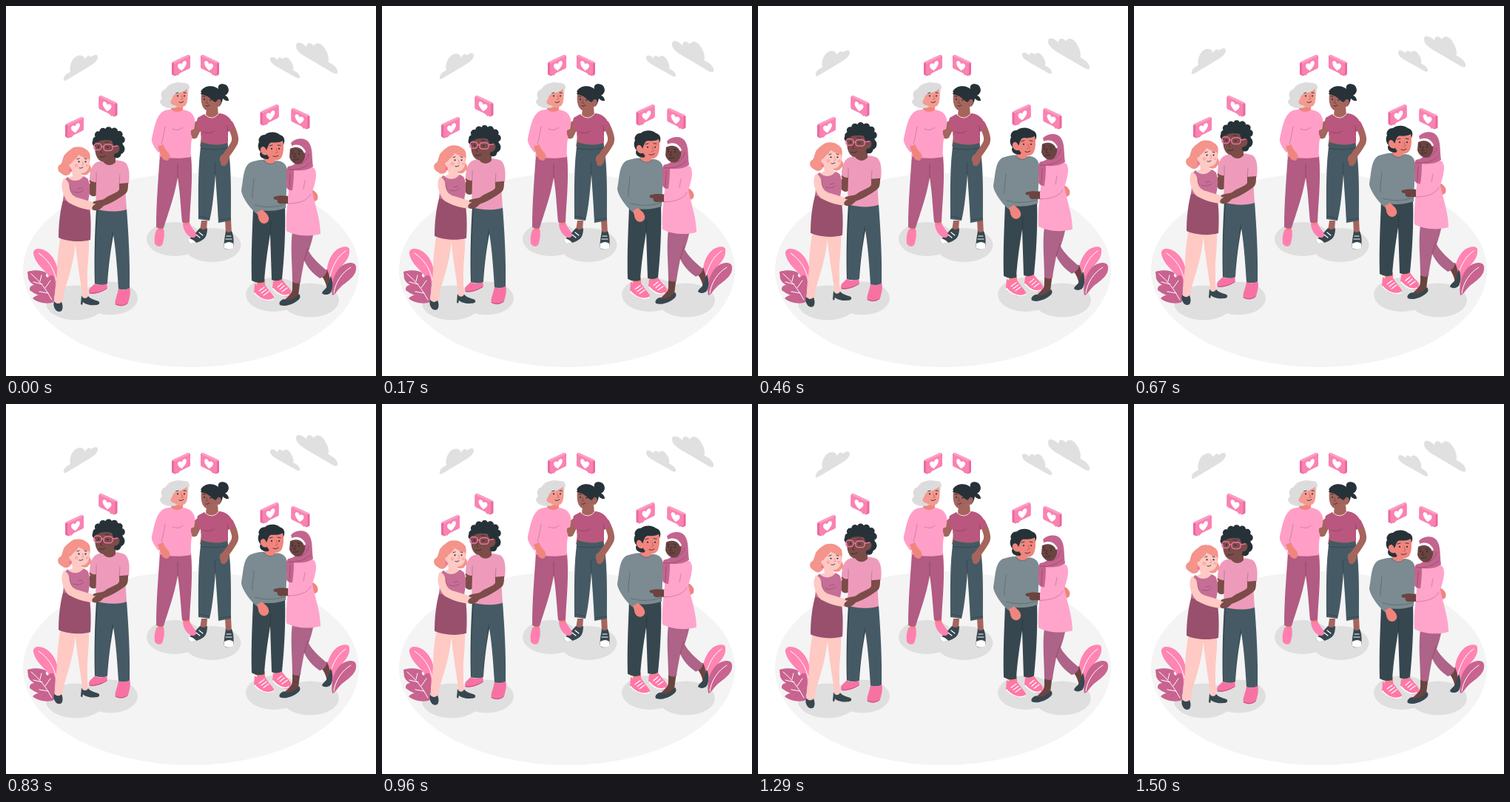
An HTML page for the animation above (1540 ms loop, 500x500 px).

```html
<!DOCTYPE html>
<html lang="en">
<head>
<meta charset="utf-8">
<title>Couples</title>
<style>
html, body { margin: 0; width: 100%; height: 100%; overflow: hidden; background: #fff; }
svg { display: block; width: 100%; height: 100%; }
.ln { fill: none; stroke-linecap: round; stroke-linejoin: round; }
.vein { stroke: #fff; stroke-width: 1; }
.brow { stroke: #263238; stroke-width: .9; }
.fold { stroke: #000; stroke-opacity: .22; stroke-width: .9; }
.lace { stroke: #fff; stroke-width: 1.2; }
.dark { fill: #263238; }
.slate { fill: #37474f; }
.denim { fill: #455a64; }
.shade { fill: #dfdfdf; }
.cloud { fill: #e0e0e0; }
.pale { fill: #ffc9c4; }
.rose { fill: #f0857d; }
.tan { fill: #a5645c; }
.umber { fill: #7b4c48; }
.deep { fill: #6b4340; }
</style>
</head>
<body>
<svg viewBox="0 0 500 500">
<defs>
  <path id="cloud" class="cloud" d="M357 72C357 67 363 69 367 73C367 69 371 68 374 72C376 68 382 69 385 75C388 79 389 84 388 87C393 89 398 93 397 97C396 99 392 97 389 95L366 82C361 79 357 76 357 72Z"/>
  <g id="like">
    <path fill="#e9699c" d="M0 12Q0 10 2 9.2L21 .6Q25-1 25 3V17L10 25L5 28.5L1.5 27.5Q0 27 0 25Z"/>
    <path fill="#ff9cc3" d="M1 10.5Q1 9.8 2 9.2L21 .6Q24-.5 24.7 2L4 12Z"/>
    <path fill="#fa82b2" d="M3 13.6Q3 12 4.7 11.2L22.3 3Q25 2 25 4.4V16.3Q25 18 23.4 18.8L11.5 24.2L8 28.2L7 26.2L5 27.2Q3 28 3 25.7Z"/>
    <path fill="#fff" d="M13.7 21.3C10 19.6 7.4 16.8 8.2 13.8C9.2 10.8 12.4 10.8 13.6 12.8C14.2 9 18.2 6.8 19.6 9.6C21 13 17 18 13.7 21.3Z"/>
  </g>
</defs>

<ellipse cx="250" cy="357" rx="227" ry="131" fill="#f4f4f4"/>
<g class="shade">
  <ellipse cx="94" cy="401" rx="40" ry="23.5"/><ellipse cx="141" cy="395" rx="37" ry="22.5"/>
  <ellipse cx="228" cy="315" rx="38" ry="23"/><ellipse cx="278.5" cy="323" rx="39" ry="23"/>
  <ellipse cx="362" cy="390" rx="38" ry="23"/><ellipse cx="411" cy="397.5" rx="39" ry="23"/>
</g>

<!-- plants -->
<g>
  <path fill="#ff85b3" d="M37 335C36 328 44 326 52 330C64 336 71 350 71 369L67 380C60 374 59 366 55 361C46 352 39 345 37 335Z"/>
  <path class="ln vein" d="M44 334C56 342 65 354 68 371"/>
  <path fill="#c96390" d="M29 359C39 356 50 357 55 361Q52 364 56 367Q62 361 65 366C68 375 67 385 65 394Q66 401 62 401C52 403 41 400 36 395Q40 391 44 391Q37 388 32 384Q31 378 38 377Q31 373 30 368Z"/>
  <path class="ln vein" d="M34 362Q51 376 62 397M46 372L48 364M53 381L60 371M49 376L37 373M57 388L45 386"/>
  <path fill="#ff85b3" d="M464 329C464 324 454 324 446 330C437 338 432 352 434 368L440 374C445 365 446 360 453 352C460 345 465 338 464 329Z"/>
  <path class="ln vein" d="M459 331C447 339 440 353 437 369"/>
  <path fill="#c96390" d="M473 353C473 346 463 345 454 351C444 359 438 375 441 391C446 389 446 386 453 379C464 370 474 364 473 353Z"/>
  <path class="ln vein" d="M466 353C453 361 445 374 443 388"/>
</g>

<!-- floating: clouds -->
<g class="float">
  <path class="cloud" d="M78 98C79 93 83 91 87 89C85 82 89 69 98 67C103 66 106 69 107 72C109 67 113 66 115 69C119 65 125 65 124 70C123 75 117 79 112 82L82 100C79 102 77 101 78 98Z"/>
  <use href="#cloud"/>
  <use href="#cloud" transform="translate(-107.8 -51.2) scale(1.4 1.46)"/>
</g>

<!-- middle couple -->
<g>
  <!-- partner on the right -->
  <path class="tan" d="M262 153C253 156 247 166 247 173C249 179 254 181 258 178L264 166Z"/>
  <path class="tan" d="M265 170H299L300 190H262ZM264 290H272L271 304H262ZM296 288H304L305 308H297Z"/>
  <path class="denim" d="M264 184C275 188 289 189 299 185C305 212 304 256 304 290L287 293C286 268 284 245 283 228C281 252 279 274 275 290L260 288C260 250 259 215 264 184Z"/>
  <path class="ln fold" d="M283 228L282 211M262 192Q280 196 300 192M289 289L304 287M261 284L275 287"/>
  <path class="slate" d="M262 300C266 303 269 302 272 300C272 306 271 312 267 315C261 320 252 322 247 319C246 316 250 312 254 309Z"/>
  <path class="slate" d="M297 304C300 307 303 306 305 304C308 311 308 319 307 326C304 330 298 330 295 327C294 319 296 311 297 304Z"/>
  <path fill="#fff" d="M247 314Q253 315 257 320Q250 322 247 319ZM295 321Q302 317 307 321L307 327Q301 331 295 327Z"/>
  <path class="ln lace" d="M257 309L262 313M261 306L266 310M298 311H304M297 315H305"/>
  <path class="ln" stroke="#a5645c" stroke-width="9" d="M303 160C308 170 311 179 309 184C306 191 300 198 296 204"/>
  <path class="tan" d="M293 200C288 203 288 208 290 211C289 215 294 218 297 215C301 211 302 205 302 200Z"/>
  <path class="tan" d="M271 138L286 136L287 148C281 153 274 152 270 148Z"/>
  <path fill="#b9577f" d="M268 146C274 153 283 152 288 145C298 146 304 151 309 164C306 168 303 169 300 170L300 184C288 189 273 187 264 182L263 170C258 165 257 158 259 151Z"/>
  <path class="ln" stroke="#ffe1d8" stroke-width="1" d="M269 147Q279 156 287 146"/>
  <path class="ln fold" d="M266 170Q274 174 281 169M300 170L299 162"/>
  <path class="dark" d="M263 116C267 107 280 106 287 112C285 105 294 103 299 108C303 114 300 119 296 121C300 122 301 126 301 128C298 129 295 127 293 125C292 130 291 133 288 136L280 125Z"/>
  <path class="tan" d="M264 119C267 114 276 114 279 120C281 124 283 127 284 128C287 123 293 127 290 133C288 136 286 137 284 136C281 141 274 143 269 140C264 136 263 127 264 119Z"/>
  <path class="dark" d="M263 119C265 112 274 110 281 113C288 117 289 123 286 127L283 130C278 128 275 121 263 119Z"/>
  <g class="dark"><circle cx="268" cy="126" r="1.1"/><circle cx="276.5" cy="127" r="1.1"/></g>
  <path class="ln brow" d="M266 122L269 122M275 123L279 124M270 135Q273 136 275 134"/>
  <path class="ln" stroke="#7b4541" stroke-width=".9" d="M272 127L270.5 131L273 131.5"/>

  <!-- partner on the left -->
  <path class="rose" d="M206 296H213L212 304H205ZM238 290H247L251 301H242Z"/>
  <path fill="#ff80b0" d="M204 301C207 305 210 304 213 301C215 309 213 318 211 323C208 326 203 325 201 321C200 314 201 307 204 301Z"/>
  <path fill="#ff80b0" d="M239 293C242 297 246 297 248 294C251 300 257 305 257 310C256 314 250 314 246 310C241 305 239 299 239 293Z"/>
  <path fill="#b25b83" d="M208 201H250C253 235 249 265 248 292Q243 294 238 292C236 270 235 250 232 232C227 260 219 280 213 300Q208 302 203 299C203 265 206 232 208 201Z"/>
  <path class="ln fold" d="M232 232L232 213"/>
  <path fill="#ff9fc7" d="M213 142C220 139 236 139 243 141C252 143 257 151 255 162C254 169 249 178 250 204C235 207 220 206 207 203L210 186C207 190 213 194 212 195L206 198C200 191 196 184 197 179C200 168 202 148 213 142Z"/>
  <path class="rose" d="M205 190L212 187C214 192 217 196 220 199C223 203 221 207 218 209C214 209 210 206 209 201Z"/>
  <path class="ln fold" stroke="#b25b83" d="M215 163Q213 176 210 187M225 166Q233 170 239 164"/>
  <path class="tan" d="M250 168Q257 164 261 169L254 179Q249 176 250 168Z"/>
  <path class="rose" d="M224 130H239V140C235 144 228 144 223 140Z"/>
  <path fill="#dcdcdc" d="M216 112C220 104 231 102 240 104C247 104 250 109 247 113C246 122 244 130 235 135C226 140 213 138 210 133C207 130 208 127 211 125C208 119 210 114 216 112Z"/>
  <path fill="#f49a90" d="M223 118C230 117 239 115 244 111C246 117 246 126 244 132C241 138 233 139 228 134C222 134 220 127 222 123Z"/>
  <path fill="#dcdcdc" d="M216 113C224 104 239 106 245 111C239 118 231 117 226 121C225 126 222 128 222 132L215 130Z"/>
  <g class="dark"><circle cx="232" cy="121.5" r="1.1"/><circle cx="241" cy="121.5" r="1.1"/></g>
  <path class="ln brow" d="M229.5 118L233 117M240 117L243 117.5M234 130Q237 132 240 129"/>
  <path class="ln" stroke="#ce665f" stroke-width=".9" d="M237 121L239 126L236.5 126.5"/>
</g>

<!-- left couple -->
<g class="float">
  <!-- partner on the right -->
  <path fill="#f772a3" d="M120 375C126 379 132 377 136 374L137 381C132 385 123 390 114 389C110 386 113 381 116 379ZM152 381C158 386 163 383 167 380C169 387 167 394 165 401C161 406 152 407 148 403C146 398 151 391 152 381Z"/>
  <path class="ln" stroke="#c24f7c" stroke-width="1" d="M113 388Q125 389 136 382M148 403Q157 407 164 402"/>
  <path class="slate" d="M122 274H148L146 305C141 330 138 355 137 375Q128 378 120 375C119 340 120 305 122 274Z"/>
  <path class="denim" d="M124 274H163C165 300 168 345 167 381Q160 385 152 382C150 350 148 325 144 303L137 360L137 375Q129 378 121 375C120 340 122 305 124 274Z"/>
  <path class="umber" d="M113 234L123 236L124 254C120 259 114 258 112 252Z"/>
  <path fill="#ee9bbb" d="M121 212C130 207 150 207 158 210C166 212 168 226 166 240L161 244L163 275C150 279 132 278 121 274L122 238Q117 239 113 235C113 226 115 216 121 212Z"/>
  <path class="ln fold" d="M122 238L122 225M153 241L154 228"/>
  <path class="umber" d="M131 203H148V211C143 217 135 216 131 210Z"/>
  <g class="dark">
    <ellipse cx="139" cy="181" rx="17" ry="13" stroke="#263238" stroke-width="9.5" stroke-linecap="round" stroke-dasharray="0 7.8"/>
    <circle cx="153" cy="193" r="7.5"/><circle cx="150" cy="200" r="5.5"/><circle cx="121" cy="185" r="4.5"/>
  </g>
  <path class="umber" d="M121 184C128 181 136 180 143 182C144 186 146 189 147 190C150 185 155 189 153 195C152 198 149 200 147 199C145 207 137 212 129 210C121 207 119 195 121 184Z"/>
  <g fill="none" stroke="#e8709f" stroke-width="1.5">
    <rect x="119" y="186" width="10" height="8.5" rx="3.5"/><rect x="132" y="187" width="12" height="8.5" rx="3.5"/>
    <path d="M129 190H132M144 190L151 189"/>
  </g>
  <g class="dark"><circle cx="125" cy="190.5" r="1.1"/><circle cx="137" cy="191" r="1.1"/></g>
  <path class="ln brow" d="M122 184L126 183M134 184L139 184M126 204Q131 205 134 203"/>
  <path class="ln" stroke="#53302e" stroke-width=".9" d="M130 193L127.5 198L130 199"/>

  <!-- partner on the left -->
  <path class="pale" d="M73 315H94C93 342 85 365 80 382C77 391 77 397 76 404L66 404C65 390 68 375 69 360C69 343 71 330 73 315ZM93 316H112C113 335 109 352 110 372C110 382 110 388 112 396L104 396C102 380 96 345 93 316Z"/>
  <path class="slate" d="M65 399C68 403 72 403 75 400C77 404 77 409 75 412C72 414 68 413 66 409C64 406 64 402 65 399ZM102 391C104 396 109 396 111 392C114 396 120 397 125 399C128 402 125 404 121 404C114 405 107 403 104 400L103 404L101 403Z"/>
  <path fill="#98506d" d="M78 259L112 264C115 283 115 300 114 316C100 320 82 318 71 313C71 295 73 276 78 259Z"/>
  <path fill="#f4948a" d="M87 194C95 187 109 191 113 199C115 207 112 211 113 215C116 218 117 224 112 225C111 229 106 229 103 228L88 224C86 229 80 231 76 227C71 225 68 219 72 215C76 213 75 211 77 206C78 201 82 198 87 194Z"/>
  <path class="pale" d="M88 218H102V229C108 231 113 234 114 240L78 243C77 236 82 232 90 230Z"/>
  <path fill="#c66e96" d="M83 231C88 237 98 239 105 230L110 233C113 240 115 246 111 264C100 267 86 266 77 262C79 253 77 243 78 236Z"/>
  <path class="ln fold" d="M91 251Q99 254 105 249M97 247L103 246"/>
  <path class="pale" d="M86 202C92 198 108 198 112 205C113 212 113 219 109 223C104 228 95 226 91 220C86 220 83 213 87 210Z"/>
  <path fill="#f4948a" d="M84 207C84 198 94 193 103 196C109 197 113 201 113 207C107 206 102 203 98 201C96 206 90 209 89 212L84 215Z"/>
  <circle cx="87" cy="222" r="2" fill="#f772a3"/>
  <g fill="#ff9d9d" opacity=".65"><circle cx="95" cy="215.5" r="2.5"/><circle cx="109.500" cy="215.500" r="2"/></g>
  <g class="dark"><circle cx="98.500" cy="210.500" r="1.1"/><circle cx="107.500" cy="210.500" r="1.1"/></g>
  <path class="ln brow" d="M96 207L99 206M106 206L109 207M99 219Q102 220 104 218"/>
  <path class="ln" stroke="#ee8d85" stroke-width=".9" d="M103 210L105 214L102.500 215"/>
  <path class="pale" d="M78 233C83 234 86 240 86 247C88 254 92 258 97 259L120 266L123 275C112 278 94 271 85 266C78 260 74 246 76 238Z"/>
  <path class="ln fold" stroke="#d98883" d="M86 242Q86 251 91 256"/>
  <path class="umber" d="M153 240L165 239C165 246 165 251 161 254C152 261 141 267 132 270C127 276 121 278 117 275C115 272 118 269 122 267C118 268 116 266 119 264C125 262 131 263 135 259C142 254 150 253 153 248Z"/>
</g>

<!-- right couple -->
<g class="float">
  <!-- partner on the left -->
  <path class="rose" d="M338 369H350V381H340ZM362 366H373V377H364Z"/>
  <path fill="#ff78a8" d="M336 375C341 379 346 377 349 374C351 380 358 387 362 393C362 398 355 399 349 398C342 396 338 390 335 387ZM361 371C365 374 370 372 373 369C376 375 383 380 385 385C385 391 381 394 375 392C367 389 362 383 360 381Z"/>
  <path class="ln" stroke="#fff" stroke-width="1.6" d="M336 388C343 396 353 400 361 396M361 382C366 388 375 394 382 390"/>
  <path class="ln lace" d="M342 385L349 380M345 388L352 383M348 391L355 386M367 380L373 375M370 383L376 378M373 386L380 381"/>
  <path class="slate" d="M334 272H377C378 305 376 340 373 369Q366 373 359 370L357 308C353 332 350 355 349 373Q340 376 332 371C331 335 333 302 334 272Z"/>
  <path class="ln fold" d="M357 308L358 292"/>
  <path class="rose" d="M349 203H364V211C360 217 352 216 348 211Z"/>
  <path fill="#7b8b91" d="M331 211C338 209 345 207 349 208C353 214 361 215 365 209C374 209 379 214 380 222L378 273C363 278 347 278 335 274L334 260C338 267 344 272 346 276L339 281C328 272 318 256 318 249C321 235 320 216 331 211Z"/>
  <path class="ln fold" d="M333 260C332 252 335 241 335 233M336 269Q356 275 378 268M348 209Q357 218 365 210"/>
  <path class="rose" d="M339 279L346 275C349 278 354 281 355 286C356 290 353 294 349 294C344 294 341 289 341 285Z"/>
  <path class="dark" d="M342 184C340 179 344 174 350 174C356 169 366 170 370 174C377 176 378 183 374 189L367 190L354 207C345 207 341 202 344 197C340 193 340 187 342 184Z"/>
  <path class="rose" d="M353 186C360 183 370 184 374 182C376 190 375 200 372 205C367 211 357 209 353 201C348 203 343 198 344 193C345 189 350 189 352 193Z"/>
  <path class="dark" d="M344 184C351 175 367 173 375 181C371 185 364 185 358 184C354 187 354 191 352 195C350 190 347 188 344 190Z"/>
  <g class="dark"><circle cx="359" cy="193" r="1.1"/><circle cx="369" cy="193" r="1.1"/></g>
  <path class="ln brow" d="M356 189L360 188M367 188L371 188.500M361 203Q365 205 368 202"/>
  <path class="ln" stroke="#cc5d58" stroke-width=".9" d="M365 193L367 198L364 199"/>

  <!-- partner on the right -->
  <path class="deep" d="M387 368H398L395 391C390 399 380 403 374 401C377 394 387 391 387 382ZM423 361L434 356C437 363 438 371 441 380L434 384C433 374 429 367 423 361Z"/>
  <path class="slate" d="M396 389C399 393 397 396 394 398C388 403 377 407 370 404C368 400 372 397 376 396C381 400 390 396 396 389ZM439 365C442 372 442 381 439 387C436 391 429 391 427 388C428 384 432 383 434 379C436 375 437 369 439 365Z"/>
  <path fill="#ae6388" d="M387 305H416C414 316 411 325 409 331C414 341 424 349 434 358Q431 366 424 368C415 362 407 353 403 344C401 356 399 364 398 374Q392 376 387 373C387 350 384 326 387 305Z"/>
  <path class="ln fold" d="M403 344L408 327"/>
  <path class="rose" d="M411 248C418 249 423 255 421 261C419 265 413 265 410 262Z"/>
  <path fill="#ffa4cb" d="M384 220C393 216 410 215 417 220C421 226 417 241 414 251C418 270 425 290 425 308C410 312 392 311 379 304C378 282 381 265 382 252Z"/>
  <path class="deep" d="M383 257C375 256 367 256 362 258C360 261 364 262 367 262C365 266 370 268 374 267L383 267Z"/>
  <path fill="#ffa4cb" d="M415 218C423 225 417 243 412 254C409 262 398 267 381 267L381 257C390 255 398 252 402 247C404 238 405 225 415 218Z"/>
  <path class="ln fold" stroke="#98506d" d="M381 267C396 267 408 263 412 254M402 247L404 236"/>
  <path fill="#c3648f" d="M385 185C391 178 404 177 409 184C415 192 413 205 415 217C408 222 397 223 389 222C389 233 388 242 387 249C383 250 379 247 379 244C380 233 377 222 381 217C386 216 391 214 393 210Z"/>
  <path class="ln fold" d="M381 221Q400 223 411 212M384 226L383 246M398 214Q408 209 409 200"/>
  <path class="deep" d="M384 192C390 187 400 188 403 194C406 202 403 210 398 213C392 216 385 211 383 204Z"/>
  <path fill="#fff" d="M384 191C390 185 401 187 405 197L403 199C400 191 392 189 384 193Z"/>
  <g class="dark"><circle cx="387" cy="199" r="1.100"/><circle cx="396" cy="199.500" r="1.100"/></g>
  <path class="ln brow" d="M385 196L388 195.500M394 195.500L398 196.500M388 208Q392 209 395 207"/>
  <path class="ln" stroke="#422522" stroke-width=".9" d="M391 199L389 204L392 204.500"/>
</g>

<g id="likes"></g>
</svg>
<script>
const LOOP = 1540, FPS = 24, CYCLE = 1500, LEAD = 40, RISE = 10;
const floats = document.querySelectorAll('.float');

// Badges: corner position, mirrored for the right one of each pair
const badge = (x, y, flip) =>
  `<use href="#like" transform="translate(${flip ? x + 25 : x} ${y}) scale(${flip ? -1 : 1} 1)"/>`;
document.getElementById('likes').innerHTML =
  [[80, 150], [125.5, 121], [224, 66], [263, 66], [343.5, 133], [385.5, 138]]
    .map(([x, y], i) => badge(x, y, i % 2)).join('');

// Linear bob up and down, shown at 24 frames per second
function draw(ms) {
  const frame = Math.min(36, Math.floor((ms % LOOP + 4) * FPS / 1000));
  const p = (frame * 1000 / FPS + LEAD) % CYCLE / CYCLE;
  const lift = RISE * (1 - Math.abs(2 * p - 1));
  floats.forEach(g => g.setAttribute('transform', `translate(0 ${(0.5 - lift).toFixed(2)})`));
}

const start = performance.now();
function tick() {
  draw(performance.now() - start);
  requestAnimationFrame(tick);
}
draw(0);
requestAnimationFrame(tick);
</script>
</body>
</html>
```
